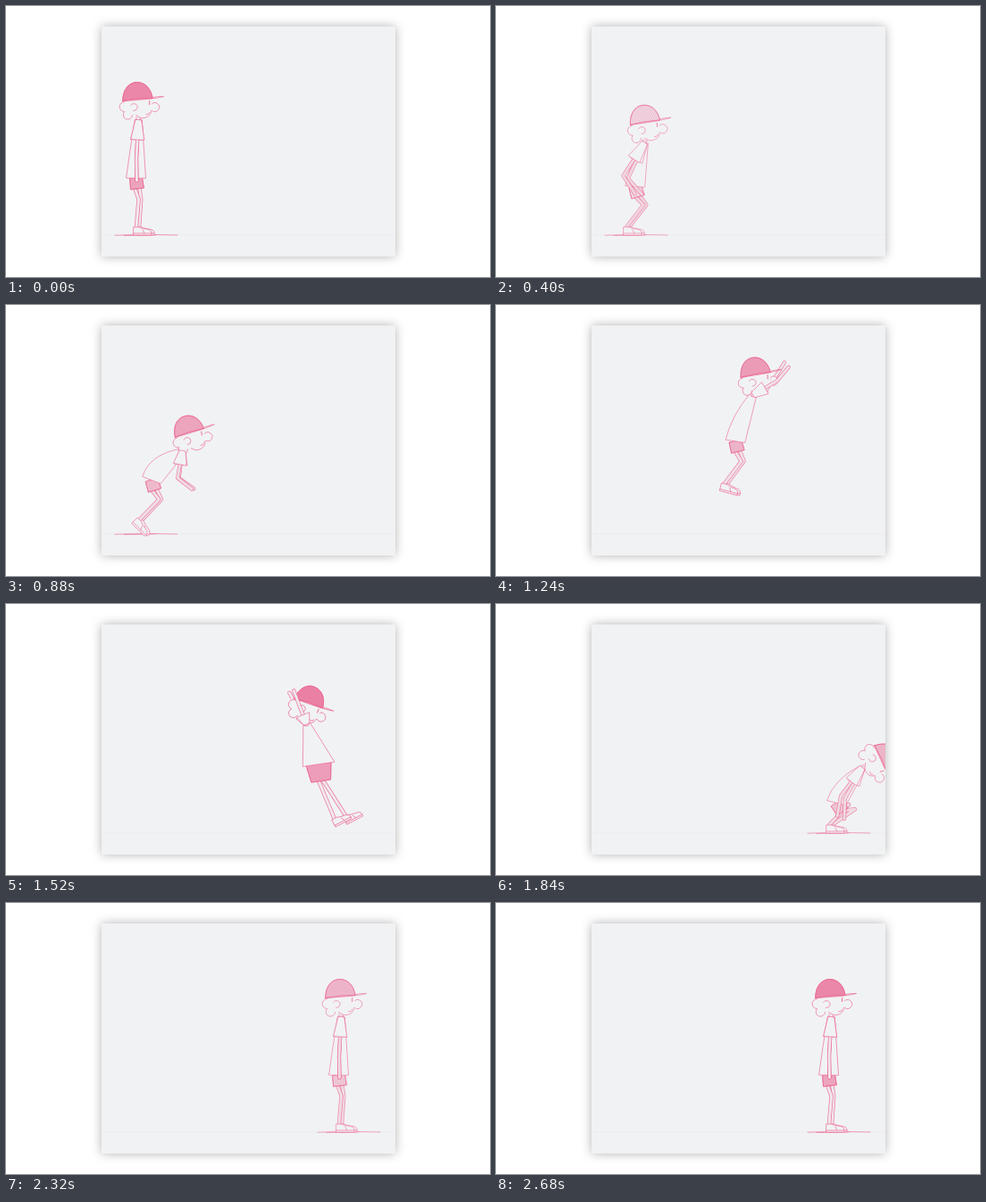
An HTML page that plays this animation: 542x304 px, repeating every 2.8 s.

```html
<!DOCTYPE html>
<html lang="en">
<head>
<meta charset="utf-8">
<title>Pencil jump</title>
<style>
  html, body { margin: 0; width: 100%; height: 100%; overflow: hidden; background: #fff; }
  svg { display: block; width: 100vw; height: 100vh; }
  .sheet { fill: #f1f2f4; filter: drop-shadow(0 0 6px rgba(0, 0, 0, .3)); }
  .crease { stroke: #e8e9ec; stroke-width: .6; }
  #figure { fill: none; stroke: #ec6b94; stroke-width: .75; stroke-linecap: round; stroke-linejoin: round; }
</style>
</head>
<body>
<svg viewBox="0 0 542 304">
  <defs>
    <clipPath id="edge"><rect x="107" y="23" width="329" height="258"/></clipPath>
    <pattern id="hatch" width="2" height="2" patternUnits="userSpaceOnUse" patternTransform="rotate(35)">
      <path d="M1 0V2" stroke="#e2477c" stroke-width=".7"/>
    </pattern>
  </defs>
  <rect class="sheet" x="107" y="23" width="329" height="258"/>
  <path class="crease" d="M107 257H436"/>
  <g clip-path="url(#edge)"><g id="figure"></g></g>
</svg>
<script>
const PAPER = '#f1f2f4';
const LEFT = 146, RIGHT = 373, FLOOR = 248;   // ankle spots
const THIGH = 12, SHIN = 31.5;

// Angles in degrees, clockwise from straight up.
// shift, rise: seat relative to the ankle; reach: foreshortening of the arms
const stand = { shift: 1, rise: 43, torso: 77, lean: 1, turn: 0,
  arm: 183, fore: 179, reach: 1, foot: 0, ink: .65 };

const poses = [
  { k: 0 },
  { k: 4, shift: 13, rise: 34, torso: 61, lean: 7, turn: -4, arm: 213, fore: 147, ink: .2 },
  { k: 6, shift: 10, rise: 25, torso: 52, lean: 18, turn: 6, arm: 238, fore: 215, ink: .3 },
  { k: 9, shift: 17, rise: 33, torso: 54, lean: 35, turn: -12, arm: 190, fore: 128, reach: .7, foot: 45, ink: .45 },
  { k: 13, shift: 15, rise: 36, torso: 66, lean: 15, turn: -5, arm: 60, fore: 40, reach: .7, foot: 15, ink: .5 },
  { k: 16, shift: -15, rise: 42, torso: 66, lean: -14, turn: 24, arm: -22, fore: -20, reach: .5, foot: -28, ink: .7 },
  { k: 19, shift: 15, rise: 15, torso: 54, lean: 24, turn: 70, arm: 217, fore: 190, reach: .9, ink: .35 },
  { k: 24, ink: .35 },
  { k: 28 }
].map(p => ({ ...stand, ...p }));

function slope(i, name) {
  const a = poses[i - 1], b = poses[i + 1];
  return a && b ? (b[name] - a[name]) / (b.k - a.k) : 0;
}

// smooth curve through the key poses
function blend(k) {
  const j = Math.max(1, poses.findIndex(p => p.k >= k)), i = j - 1;
  const a = poses[i], b = poses[j], d = b.k - a.k, u = (k - a.k) / d, w = 1 - u;
  const out = {};
  for (const n in stand) {
    out[n] = w * w * (1 + 2 * u) * a[n] + u * u * (3 - 2 * u) * b[n] +
      d * u * w * (w * slope(i, n) - u * slope(j, n));
  }
  return out;
}

const rad = a => a * Math.PI / 180;
const step = ([x, y], a, l) => [x + l * Math.sin(rad(a)), y - l * Math.cos(rad(a))];
const mid = (a, b) => [(a[0] + b[0]) / 2, (a[1] + b[1]) / 2];
const line = pts => 'M' + pts.map(p => p.map(n => n.toFixed(1)).join(' ')).join('L');
const path = (d, attrs = '') => `<path d="${d}" ${attrs}/>`;
const filled = d => path(d, `fill="${PAPER}"`);

// knee of a two-bone leg, bent forward
function knee(hip, ankle) {
  const x = ankle[0] - hip[0], y = ankle[1] - hip[1], l = Math.hypot(x, y);
  const along = Math.min(THIGH, (THIGH ** 2 - SHIN ** 2 + l * l) / (2 * l));
  const out = Math.sqrt(Math.max(0, THIGH ** 2 - along ** 2));
  return [hip[0] + (x * along + y * out) / l, hip[1] + (y * along - x * out) / l];
}

function limb(pts, w) {
  const d = line(pts);
  return path(d, `stroke-width="${w + 1.4}"`) + path(d, `stroke="${PAPER}" stroke-width="${w}"`);
}

function shaded(d, ink) {
  return filled(d) +
    path(d, `fill="#ec6b94" fill-opacity="${ink}"`) +
    path(d, `fill="url(#hatch)" fill-opacity="${ink}" stroke="none"`);
}

// strip between two points, wider at one end
function taper(a, b, angle, wa, wb) {
  return line([step(a, angle - 90, wa), step(b, angle - 90, wb),
    step(b, angle + 90, wb), step(a, angle + 90, wa)]) + 'Z';
}

const placed = (at, turn, body) => `<g transform="translate(${at}) rotate(${turn})">${body}</g>`;

const shoe = (at, turn) => placed(at, turn,
  filled('M-3 0L3 0C8 3 16 1 17 6V9H-3Z') + path('M-3 7H17M7 3L9 7'));

const head = (at, turn, ink) => placed(at, turn,
  path('M-17 -1a5.5 5.5 0 1 0 1 12a5 5 0 0 0 10 5L2 18C9 19 14 15 14 9L15 -4Z', `fill="${PAPER}" stroke="none"`) +
  path('M-16 0a5.5 5.5 0 1 0 0 11a5.2 5.2 0 1 0 9 4M-9 4a4 4 0 1 1 3 6') +
  path('M14 10C14 15 9 19 2 18L-3 15M8 14q3 1 4 -2') +
  filled('M15 2a5 5 0 1 1 0 8') +
  path('M12 -1v4', 'stroke-width="1.1"') +
  shaded('M-18 -1C-18 -14 -11 -22 -2 -22C8 -22 14 -14 15.5 -4Q-2 -4 -18 -1Z', ink) +
  path('M-17 -1Q18 -3 28 -6Q20 -6 15 -5'));

function leg(hip, ankle, turn) {
  return limb([hip, knee(hip, ankle), ankle], 3) + shoe(ankle, turn);
}

function arm(neck, p, swing) {
  const bone = 22 * p.reach, a = p.arm + swing;
  const cuff = step(neck, a, bone), elbow = step(cuff, a, bone);
  const hand = step(elbow, p.fore + swing, 12 * (1 + p.reach));
  return limb([cuff, elbow, hand], 2.8) + filled(taper(neck, cuff, a, 3.5, 7.5));
}

// ankle: on tiptoe before the leap, along an arc during it
function anklePoint(k, turn) {
  const u = Math.min(1, Math.max(0, (k - 9.5) / 7.2));
  const tip = Math.max(0, Math.sin(rad(turn)));
  return [
    LEFT + (RIGHT - LEFT) * (1 - Math.cos(Math.PI * u)) / 2 + 5 * tip,
    FLOOR - 45 * Math.abs(Math.sin(Math.PI * u)) ** 1.5 - 10 * tip
  ];
}

function draw(k) {
  const p = blend(k);
  const loose = Math.max(0, -p.foot) / 4;   // cloth and feet spread when falling
  const ankle = anklePoint(k, p.foot);
  const ankle2 = [ankle[0] + 3 + loose * 1.4, ankle[1] - loose * .4];
  const seat = [ankle[0] + p.shift, ankle[1] - p.rise];
  const neck = step(seat, p.lean, p.torso);
  const skull = step(neck, p.lean * .8 + Math.max(0, p.turn) * .7, 20.5);

  const tilt = p.rise - 50;
  const hem = step(seat, tilt, 12 + loose);
  const slant = p.lean * .6;
  const back = step(hem, slant - 90, 11 + loose), front = step(hem, slant + 90, 11 + loose);
  const nape = step(neck, p.lean - 90, 4), throat = step(neck, p.lean + 90, 4);
  const bend = step(mid(nape, back), p.lean - 90, Math.max(0, p.lean * .45));
  const shirt = `${line([nape])}Q${bend} ${back}L${front}L${throat}`;

  const x = k < 13 ? LEFT : RIGHT;
  const airborne = k > 10 && k < 17;
  const ground = airborne ? '' : path(`M${x - 24} 257.2Q${x + 8} 256 ${x + 46} 257M${x - 14} 257.5L${x + 22} 256.8`);

  const figure = document.getElementById('figure');
  figure.setAttribute('stroke-opacity', .65 + .4 * p.ink);
  figure.innerHTML = ground +
    leg(step(seat, tilt + 90, 2.5), ankle2, p.foot) +
    leg(step(seat, tilt - 90, 2.5), ankle, p.foot) +
    shaded(taper(hem, seat, tilt, 7 + loose, 7.5 + loose / 2), p.ink * .7) +
    filled(shirt) +
    arm(neck, p, -8 * Math.min(1, Math.abs(p.arm - stand.arm) / 20)) +
    limb([neck, skull], 4) +
    head(skull, p.turn, p.ink) +
    arm(neck, p, 0);
}

// five drawings every 480 ms, held for 80 or 120 ms
const beats = [0, 80, 200, 280, 400];
const start = performance.now();
let shown = -1;

function tick() {
  const t = (performance.now() - start) % 2800;
  const k = Math.floor(t / 480) * 5 + beats.filter(b => b <= t % 480).length - 1;
  if (k !== shown) draw(shown = k);
  requestAnimationFrame(tick);
}
tick();
</script>
</body>
</html>
```
